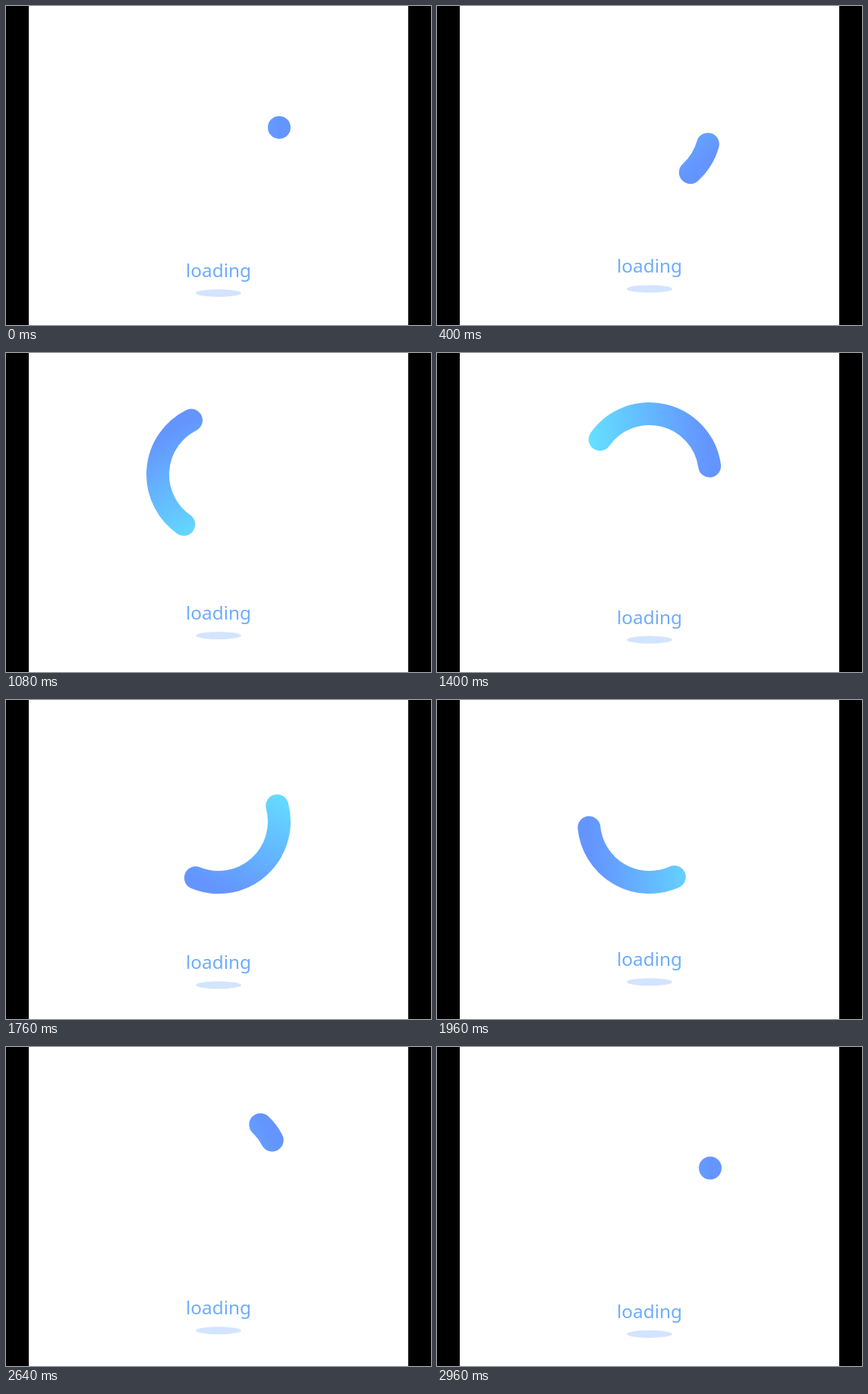
Recreate the animation shown at these times as an HTML page. Size 560x420 px, loop 3000 ms.

```html
<!DOCTYPE html>
<html lang="en">
<head>
<meta charset="utf-8">
<title>Loading</title>
<style>
  html, body { margin: 0; width: 100%; height: 100%; overflow: hidden; background: #000; }
  svg { display: block; }
  text { font: 24.4px "Noto Sans", "Open Sans", sans-serif; fill: #6eacff; text-anchor: middle; }
</style>
</head>
<body>
<svg width="560" height="420" viewBox="0 0 560 420">
  <defs>
    <linearGradient id="shade" gradientUnits="userSpaceOnUse" x1="80" y1="0" x2="-80" y2="0">
      <stop offset="0" stop-color="#6495ff"/>
      <stop offset="1" stop-color="#64e4ff"/>
    </linearGradient>
  </defs>
  <rect x="30" width="500" height="420" fill="#fff"/>
  <path id="worm" fill="none" stroke="url(#shade)" stroke-width="30" stroke-linecap="round"/>
  <g id="label">
    <text x="280" y="357">loading</text>
    <ellipse cx="280" cy="378" rx="30" ry="5" fill="#d3e4ff"/>
  </g>
</svg>
<script>
  const LOOP = 3000, STEP = 40, RADIUS = 80, TURN = 720;
  const worm = document.getElementById('worm');
  const label = document.getElementById('label');

  // Same curve as CSS cubic-bezier(x1, 0, x2, 1), solved by bisection
  function ease(x1, x2) {
    return u => {
      let low = 0, high = 1, s;
      for (let i = 0; i < 30; i++) {
        s = (low + high) / 2;
        const r = 1 - s;
        const x = 3 * s * r * (r * x1 + s * x2) + s ** 3;
        if (x < u) low = s; else high = s;
      }
      return s * s * (3 - 2 * s);
    };
  }

  // Both ends make two turns; the tail sets off and arrives later
  const headEase = ease(.262, .67);
  const tailEase = ease(.53, .735);

  function draw(u) {
    const head = TURN * headEase(u);
    const span = Math.max(head - TURN * tailEase(u), .05) * Math.PI / 180;
    const x = RADIUS * Math.cos(span), y = -RADIUS * Math.sin(span);
    worm.setAttribute('d', `M${RADIUS} 0A${RADIUS} ${RADIUS} 0 0 0 ${x} ${y}`);
    worm.setAttribute('transform', `translate(280 160) rotate(${head})`);

    // Two bobs per loop
    const lift = 5 * (1 - Math.cos(4 * Math.PI * u));
    label.setAttribute('transform', `translate(0 ${-lift})`);
  }

  const start = performance.now();
  function tick() {
    const t = (performance.now() - start) % LOOP;
    draw(Math.floor(t / STEP) * STEP / LOOP);
    requestAnimationFrame(tick);
  }
  tick();
</script>
</body>
</html>
```
